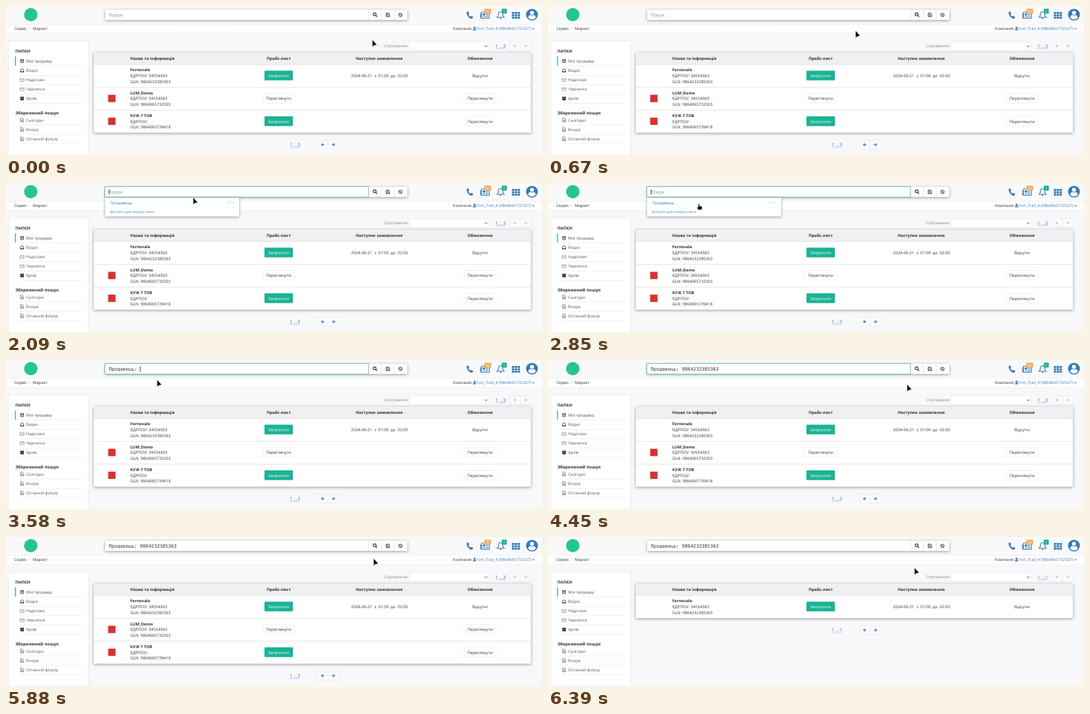
These frames come from a looping animation (800 by 224 pixels, 7610 ms). An HTML page:

```html
<!DOCTYPE html>
<html lang="uk">
<head>
<meta charset="utf-8">
<style>
  html, body { margin: 0; width: 100%; height: 100%; overflow: hidden; background: #f8f8fb; }
  svg { display: block; width: 800px; height: 224px; }
  text { font-family: "Open Sans", "Noto Sans", sans-serif; white-space: pre; text-rendering: geometricPrecision; }
  .mono { font-family: "DejaVu Sans Mono", monospace; }
  .card { filter: drop-shadow(0 1px 2px #0006); }
  .soft { filter: drop-shadow(0 0 1px #0002); }
</style>
</head>
<body>
<svg id="stage" viewBox="0 0 800 224"></svg>
<script>
const GREEN = '#1ab394', BLUE = '#337ab7', INK = '#333', GREY = '#555', LINE = '#e4e4e8';
const LOOP = 7610, FOCUS = 1640, PICK = 3240, PASTE = 3700, BLUR = 5400, FILTER = 5925;

const rect = (x, y, w, h, fill, extra = '') =>
  `<rect x="${x}" y="${y}" width="${w}" height="${h}" fill="${fill}" ${extra}/>`;
const text = (x, y, str, { size = 6.06, fill = INK, bold, anchor = 'start', cls = '', id = '' } = {}) =>
  `<text x="${x}" y="${y}" font-size="${size}" fill="${fill}" font-weight="${bold ? 700 : 400}"
    text-anchor="${anchor}" class="${cls}" id="${id}">${str}</text>`;
const line = (d, stroke, width = 1, extra = '') =>
  `<path d="${d}" fill="none" stroke="${stroke}" stroke-width="${width}" ${extra}/>`;
const shape = (d, fill, extra = '') => `<path d="${d}" fill="${fill}" ${extra}/>`;
const circle = (x, y, r, fill, extra = '') => `<circle cx="${x}" cy="${y}" r="${r}" fill="${fill}" ${extra}/>`;
const at = (x, y, body, id = '') => `<g transform="translate(${x} ${y})" id="${id}">${body}</g>`;
const middle = { anchor: 'middle' };

function button(cx, cy, label, primary) {
  const w = primary ? 42 : 47.5;
  return rect(cx - w / 2, cy - 7.2, w, 14.2, primary ? GREEN : '#fff',
    `rx="1.2" stroke="${primary ? GREEN : '#e2e2e6'}" stroke-width=".5"`) +
    text(cx, cy + 2.2, label, { ...middle, fill: primary ? '#fff' : INK });
}

const arrow = (x, y, dir, color) =>
  at(x, y, line(`M${-2.4 * dir} 0H${2 * dir}M0 -2.1L${2.1 * dir} 0L0 2.1`, color, 1.1));

const arrowPair = (x, y, color) =>
  rect(x, y - 6.5, 32, 13, '#fbfbfd', `rx="1.5" stroke="${LINE}" stroke-width=".6"`) +
  line(`M${x + 15.7} ${y - 6.5}v13`, LINE, .6) +
  arrow(x + 8, y, -1, color) + arrow(x + 23.4, y, 1, color);

const pages = (x, y, last) =>
  text(x, y, `1 ...${last}`, { size: 7, fill: BLUE }) +
  line(`M${x} ${y + 1.8}h15`, BLUE, .5, 'stroke-dasharray="1 .6"');

function header() {
  const grid = [0, 1, 2].flatMap(r => [0, 1, 2].map(c => rect(755 + c * 4.3, 9 + r * 3.6, 3.5, 2.8, BLUE))).join('');
  return rect(0, 0, 800, 28, '#f9f9fb') + rect(0, 28, 800, 13, '#fff') +
    line('M0 27.800H800M0 41.200H800', '#ebebf0', .6) +
    circle(37, 13, 10, '#22c78f') +
    shape('M687.500 9.300l2.200-1.300 1.700 3-1.200 1.400q1 2.400 3.300 3.500l1.400-1.100 2.400 1.900-1.200 2q-2 .8-4.500-1Q687.500 14 687.500 9.300z', BLUE) +
    rect(709.5, 9, 12, 9.5, 'none', `rx="1" stroke="${BLUE}" stroke-width="1.1"`) +
    line('M708.300 11v6q0 1.500 1.500 1.500', BLUE, 1) +
    rect(711.5, 11.2, 3.5, 3.2, BLUE) + line('M716 12h4M716 14h4M711.500 16.300h8.500', BLUE, .9) +
    rect(714, 4, 10, 7.5, '#f8ac59', 'rx="1"') + text(719, 9.7, '92', { ...middle, size: 5, fill: '#fff' }) +
    line('M733 17q2-1.500 2-5q.4-3.500 3.200-3.500t3.200 3.500q0 3.500 2 5z', BLUE, 1.2) +
    shape('M736.600 17.800h3.200q-.4 1.600-1.600 1.600t-1.600-1.600z', BLUE) +
    rect(740, 4, 7.5, 7.5, GREEN, 'rx="1"') + text(743.8, 9.6, '1', { ...middle, size: 5, fill: '#fff' }) +
    grid +
    circle(785, 13, 8.8, BLUE) + circle(785, 10.2, 3, '#fff') +
    shape('M779.300 17.800q.5-4 3.200-4.300 2.500 1.600 5 0 2.700.3 3.200 4.300-5.700 5-11.400 0z', '#fff') +
    text(12.3, 36.4, 'Сервіс') + text(34, 36.4, '/', { fill: '#aaa' }) + text(40, 36.4, 'Маркет') +
    text(667, 36.4, 'Компанія:') +
    circle(699.2, 32.6, 1.5, BLUE) + shape('M696.800 36.500q0-2.500 2.400-2.500t2.400 2.500z', BLUE) +
    text(784, 36.4, 'Fort_Trail_4 (9864065732327)', { fill: BLUE, anchor: 'end' }) +
    shape('M785.300 33.500h3.600l-1.800 2z', BLUE);
}

function search() {
  return `<g class="card">${rect(148, 5.5, 451, 15.5, '#fff', 'rx="1"')}</g>` +
    line('M541.300 5.500v15.500M560.300 5.500v15.500M579.300 5.500v15.500', '#dcdce0', .7) +
    circle(550.2, 12.6, 2.2, 'none', `stroke="${INK}" stroke-width="1.1"`) + line('M551.800 14.200l2 2', INK, 1.3) +
    line('M567.300 10.700h4l1.300 1.300v4h-5.300z', INK, .8) + line('M568.600 11v1.600h2.300V11M568.600 16v-1.800h2.700v1.800', INK, .7) +
    circle(588.8, 13.3, 2.5, 'none', `stroke="${INK}" stroke-width="1"`) + line('M587 11.500l3.600 3.600', INK, 1) +
    rect(147.7, 5.3, 393.3, 15.8, 'none', `stroke="${GREEN}" stroke-width=".6" id="focus"`) +
    text(153.5, 15.8, '', { size: 7, cls: 'mono', id: 'query' }) +
    rect(0, 9.5, .8, 8, '#111', 'id="caret"');
}

function sidebar() {
  const icons = {
    contact: rect(-2.6, -2.8, 5.2, 5.6, GREY, 'rx=".6"') + circle(0, -.8, .9, '#fff') + rect(-1.5, .5, 3, 1.2, '#fff'),
    inbox: shape('M-3 .5l1-3h4l1 3v2.200h-6zM-1.600-1.600l-.7 2.100h1.200l.5 1h1.200l.5-1h1.200l-.7-2.100z', GREY, 'fill-rule="evenodd"'),
    mail: line('M-3-2h6v4.500h-6zM-3-1.300l3 2.200 3-2.200', '#777', .6),
    card: line('M-3-2h6v4.300h-6zM-3-.7h6', '#888', .7),
    archive: shape('M-3-2.600h6v1.500h-6zM-2.600-.8h5.200v3.500h-5.200z', INK),
    page: line('M-2.300-2.800h3l1.600 1.600v4h-4.600zM-1.100 0h2.200M-1.100 1.300h2.200', GREY, .7)
  };
  const item = (y, icon, label) =>
    at(24, y, icons[icon]) + text(30, y + 2.3, label, { fill: GREY }) +
    line(`M20 ${y + 7.4}H116`, LINE, .6);
  return `<g class="soft">${rect(4, 53, 119, 175, '#fff')}</g>` +
    text(14, 70, 'ПАПКИ', { bold: true }) + rect(13.5, 75.8, 1.3, 13.8, GREEN) +
    item(82.8, 'contact', 'Мої продавці') + item(97, 'inbox', 'Вхідні') + item(111, 'mail', 'Надіслані') +
    item(125, 'card', 'Чернетки') + item(139, 'archive', 'Архів') +
    text(14, 163, 'Збережений пошук', { bold: true, size: 6.3 }) +
    item(171.4, 'page', 'Сьогодні') + item(185.6, 'page', 'Вчора') + item(199.8, 'page', 'Останній фільтр');
}

function row(y, name, code, gln, logo) {
  return (logo ? rect(152.5, y - 5.5, 11, 11, '#d9312f') : '') +
    text(185.5, y - 6.3, name, { bold: true }) +
    text(185.5, y + 2.3, 'ЄДРПОУ: ' + code) + text(185.5, y + 11, 'GLN: ' + gln);
}

function table(filtered) {
  const bottom = filtered ? 122 : 190.5, last = filtered ? 1 : 3, py = filtered ? 140 : 208.5;
  const title = (x, str, anchor = 'middle') => text(x, 81.3, str, { bold: true, anchor });
  return `<g class="card">${rect(131, 70, 652.5, bottom - 70, '#fff')}</g>` +
    rect(131, 70, 652.5, 18, '#f0f0f3') + line('M131 88H783.500', '#dddde1', .8) +
    title(185.5, 'Назва та інформація', 'start') + title(407, 'Прайс-лист') +
    title(557, 'Наступне замовлення') + title(707.5, 'Обмеження') +
    row(104.6, 'Fernovale', '34554363', '9864232385363') + button(407, 104.6, 'Запросити', true) +
    text(557.5, 106.9, '2024-06-21  з  01:00  до  02:00', middle) + text(707.5, 106.9, 'Відсутні', middle) +
    (filtered ? '' :
      line('M131 122.300H783.500M131 156.500H783.500', '#dddde1', .8) +
      row(139, 'LUM_Demo', '34554363', '9864065732303', true) + button(407, 139, 'Переглянути') + button(707.5, 139, 'Переглянути') +
      row(173.3, 'КУЖ 7 ТОВ', '', '9864065739418', true) + button(407, 173.3, 'Запросити', true) + button(707.5, 173.3, 'Переглянути')) +
    pages(730.5, 62.5, last) + pages(423.5, py + 2.3, last) + arrowPair(465, py, BLUE);
}

const sorting = text(564, 62.3, 'Сортування', { fill: '#888' }) +
  rect(601.5, 53.5, 120, 13.5, '#fff', 'rx="1.500" stroke="#e2e2e8" stroke-width=".6"') +
  line('M714.800 59.500l1.900 1.900 1.900-1.900', INK, .9) + arrowPair(752, 60, '#c9c9d2');

const dropdown = `<g id="dropdown"><g class="card">${rect(148, 22, 200, 28.3, '#fff')}</g>` +
  line('M148 37.300h200', '#ececf0', .5) + text(155.3, 31.7, 'Продавець', { fill: BLUE }) +
  text(340, 31.3, 'GLN', { size: 5.4, fill: '#ccc', anchor: 'end' }) +
  text(155.3, 45.2, 'Доступні для пошуку ключі', { size: 5.05, fill: BLUE }) + '</g>';

const outline = 'stroke="#fff" stroke-width=".5" stroke-linejoin="round"';
const pointer = at(0, 0,
  shape('M0 0V11L2.900 8.500L7 8z', '#000', outline + ' id="arrow"') +
  shape('M-.9.800Q0-.600.9.800V3.500L4.500 4.300Q5.300 4.600 5 6L4.300 9.300H-.6L-3 5.900Q-2.600 4.700-.9 5.800z', '#000', outline + ' id="hand"'),
  'pointer');

document.getElementById('stage').innerHTML = rect(0, 0, 800, 224, '#f8f8fb') + header() + sidebar() + sorting +
  `<g id="all">${table(false)}</g><g id="found">${table(true)}</g>` + search() + dropdown + pointer;

const $ = id => document.getElementById(id);
const show = (id, on) => $(id).setAttribute('display', on ? 'inline' : 'none');

// Each stroke: start, end, target x, target y
const strokes = [
  [0, 1600, 316, 15.3], [1700, 2600, 225, 31], [3240, 3420, 225.5, 29.5],
  [3580, 4450, 536, 36.5], [4520, 5120, 551, 14], [5450, 6240, 547, 46]
];
function pointerAt(t) {
  let x = 546.8, y = 50.5;
  for (const [from, to, tx, ty] of strokes) {
    const u = Math.min(1, Math.max(0, (t - from) / (to - from))), e = u * u * (3 - 2 * u);
    x += (tx - x) * e;
    y += (ty - y) * e;
  }
  return [x, y];
}

function draw(now) {
  const t = now % LOOP;
  const focused = t >= FOCUS && t < BLUR, open = t >= FOCUS && t < PICK;
  const query = t < PICK ? '' : t < PASTE ? 'Продавець: ' : 'Продавець: 9864232385363';
  const lastInput = t < PICK ? FOCUS : t < PASTE ? PICK : PASTE;
  const [x, y] = pointerAt(t), hovering = open && y > 23;

  $('query').textContent = query || 'Пошук';
  $('query').setAttribute('fill', query ? INK : '#999');
  $('caret').setAttribute('x', 153.5 + query.length * 4.214);
  $('pointer').setAttribute('transform', `translate(${x} ${y})`);
  show('focus', focused);
  show('caret', focused && (t - lastInput) % 1060 < 530);
  show('dropdown', open);
  show('hand', hovering);
  show('arrow', !hovering);
  show('all', t < FILTER);
  show('found', t >= FILTER);
  requestAnimationFrame(() => draw(performance.now() - start));
}
const start = performance.now();
draw(0);
</script>
</body>
</html>
```
